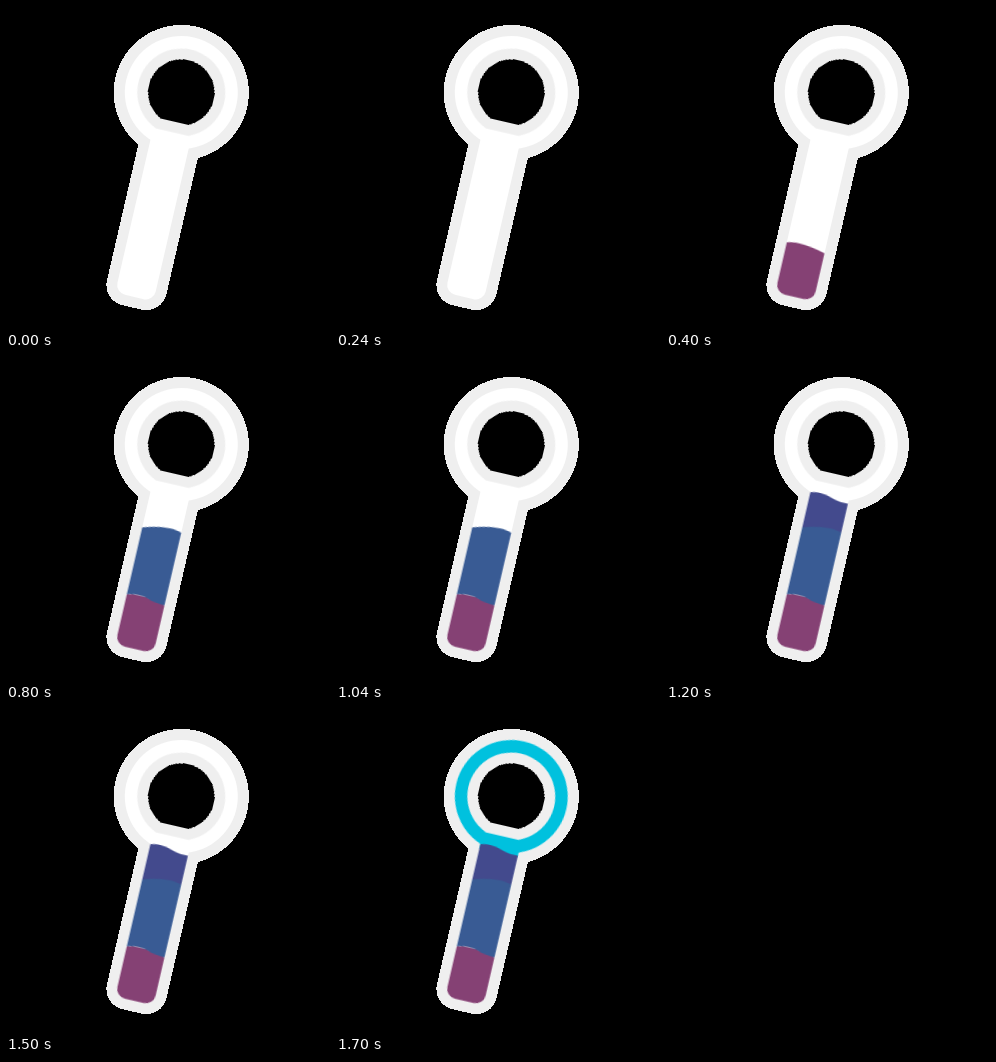
An HTML page that plays this animation: 324x324 px, repeating every 2 s.

```html
<!DOCTYPE html>
<html lang="en">
<head>
<meta charset="utf-8">
<title>Filling magnifier</title>
<style>
  html, body { margin: 0; width: 100%; height: 100%; overflow: hidden; background: #000; }
  svg { display: block; width: 100vw; height: 100vh; }
  .fill { opacity: 0; }
  .crisp { shape-rendering: crispEdges; }
</style>
</head>
<body>
<svg viewBox="0 0 324 324">
  <defs>
    <clipPath id="tube"><rect x="-19.4" y="30" width="39.2" height="179.8" rx="10"/></clipPath>
  </defs>
  <!-- Origin at the lens centre, y axis along the handle -->
  <g transform="translate(175.3 86.5) rotate(13)">
    <g class="crisp" fill="#efefef">
      <circle r="67.6"/>
      <rect x="-30.2" y="30" width="61.1" height="190.5" rx="20.6"/>
    </g>
    <g fill="#fff">
      <circle r="56.5"/>
      <rect x="-19.4" y="30" width="39.2" height="179.8" rx="10"/>
    </g>
    <g class="fill" data-start="1700" fill="#00c1de">
      <circle r="56.5"/>
      <rect x="-19.4" y="45" width="39.2" height="13"/>
    </g>
    <!-- Neighbouring fills overlap so that no seam shows -->
    <g clip-path="url(#tube)">
      <path class="fill" data-start="400" fill="#854174"
        d="M-20 158.4C-10 155.4 2 156.2 20 160.6V212H-20Z"/>
      <path class="fill" data-start="1200" fill="#434a8d"
        d="M-20 53.4C-10 51 -4 51.8 2 54C8 56.2 13 56.4 20 56.2V100H-20Z"/>
      <path class="fill" data-start="800" fill="#395b94"
        d="M-20 89.8C-8 86.2 7 82 20 86V160.6C12 160 8 159.6 4.5 158.4C-2 156.2 -9 155.2 -20 158.4Z"/>
    </g>
    <path id="rim" fill="#efefef"/>
    <path id="hole" class="crisp" fill="#000"/>
  </g>
</svg>
<script>
  const LOOP = 2000;

  // Circle flattened by a chord at the given depth below its centre.
  const cutCircle = (r, depth) => {
    const half = Math.sqrt(r * r - depth * depth);
    return `M${-half} ${depth}A${r} ${r} 0 1 1 ${half} ${depth}Z`;
  };
  document.getElementById('rim').setAttribute('d', cutCircle(44, 40.7));
  document.getElementById('hole').setAttribute('d', cutCircle(33.2, 29.9));

  for (const part of document.querySelectorAll('.fill')) {
    const offset = part.dataset.start / LOOP;
    const animation = part.animate([
      { opacity: 0, offset: 0 },
      { opacity: 0, offset },
      { opacity: 1, offset },
      { opacity: 1, offset: 1 }
    ], { duration: LOOP, iterations: Infinity });
    animation.startTime = 0;
  }
</script>
</body>
</html>
```
